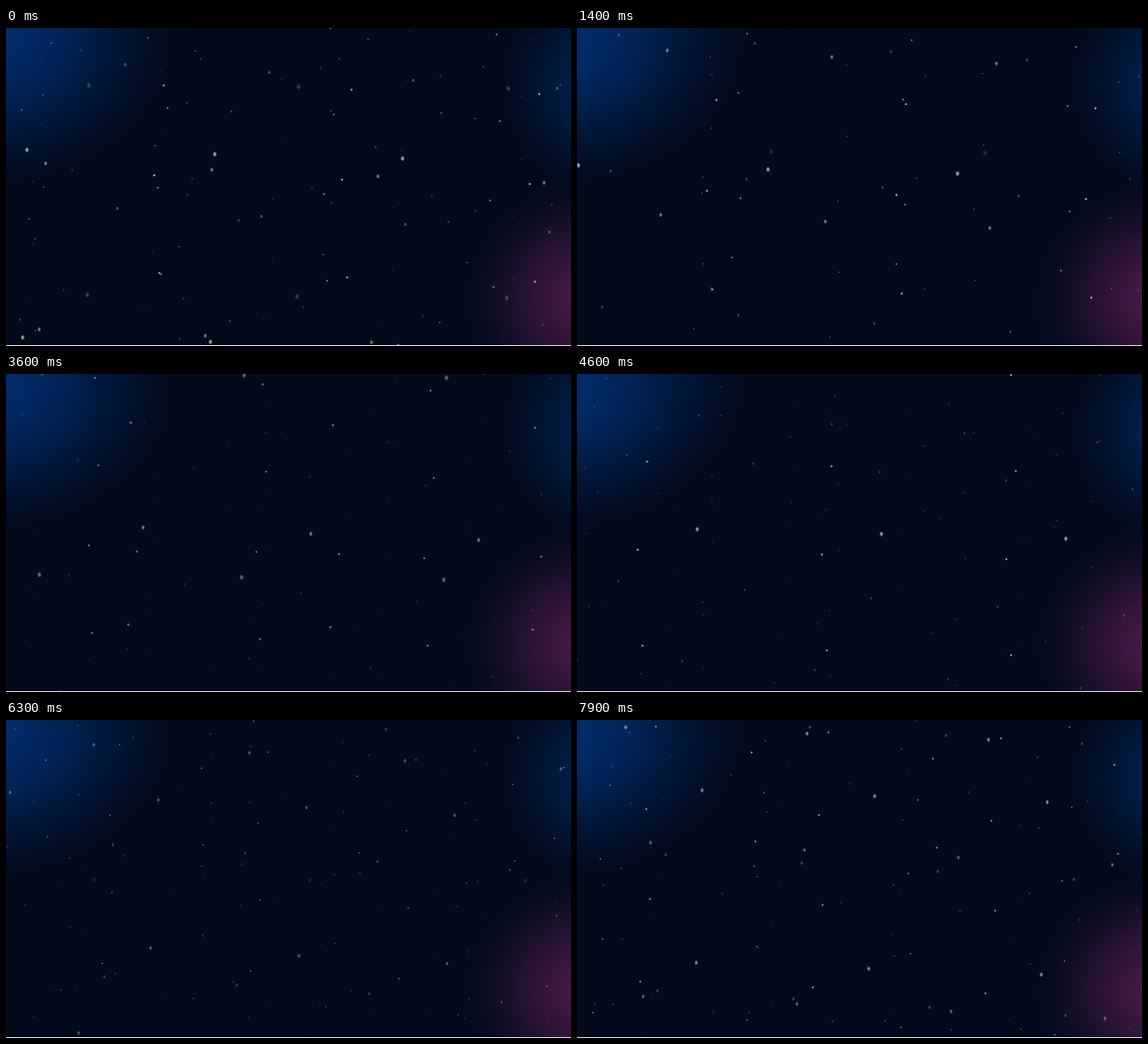
Animation of 600 by 338 pixels, one loop 8000 ms. Source, as an HTML page with a canvas:

```html
<!DOCTYPE html>
<html lang="en">
<head>
<meta charset="utf-8">
<title>Star field</title>
<style>
  html, body { margin: 0; width: 100%; height: 100%; overflow: hidden; background: #020a1c; }
  canvas { display: block; }
</style>
</head>
<body>
<canvas id="sky" width="600" height="338"></canvas>
<script>
const W = 600, H = 338, LOOP = 8000, STEP = 100, CYCLE = 10000;
const CENTER = [328, 169], TILE = 106;
const ctx = document.getElementById('sky').getContext('2d');

// Offsets inside a tile: one large oval star, two small round ones.
const COMMON = [[0, 0], [-33.9, 12.7], [-29.7, -38.2]];
const WIDE = [[0, 0], [46.9, 25.6], [50.9, -12.8]];
const TALL = [[0, 0], [-33.6, 12.8], [-29.5, 67.4]];

const layer = (phase, x, y, stars = COMMON, w = TILE, h = TILE) => ({ phase, x, y, stars, w, h });
const layers = [
  layer(0.95, -8.6, -50.6),
  layer(0.95, -51.4, -87.7, TALL, 111.4, 206.4),
  layer(0.83, 49.1, -17.2),
  layer(0.70, 39.9, -8.4),
  layer(0.55, -38.1, 23.7, WIDE),
  layer(0.35, -2.5, 0.6)
];

function radial(stops) {
  const g = ctx.createRadialGradient(0, 0, 0, 0, 0, 1);
  stops.forEach(([at, color]) => g.addColorStop(at, color));
  return g;
}

const dot = v => radial([[0, `rgb(${v},${v},${v})`], [1, `rgba(${v},${v},${v},0)`]]);
const kinds = [
  { rx: 1.27, ry: 1.7, fill: dot(221) },
  { rx: 0.85, ry: 0.85, fill: dot(255) },
  { rx: 0.85, ry: 0.85, fill: dot(238) }
];

function oval(x, y, rx, ry, fill) {
  ctx.save();
  ctx.translate(x, y);
  ctx.scale(rx, ry);
  ctx.fillStyle = fill;
  ctx.fillRect(-1, -1, 2, 2);
  ctx.restore();
}

function glow(x, y, rx, ry, rgb) {
  const fade = [[0, 1], [0.2, 0.89], [0.4, 0.68], [0.6, 0.39], [0.8, 0.13], [0.9, 0.04], [1, 0]];
  oval(x, y, rx, ry, radial(fade.map(([at, a]) => [at, `rgba(${rgb},${a})`])));
}

// cubic-bezier(.42, 0, 1, 1)
function easeIn(x) {
  let lo = 0, hi = 1;
  for (let i = 0; i < 24; i++) {
    const u = (lo + hi) / 2;
    const bx = 1.26 * u * (1 - u) ** 2 + 3 * (1 - u) * u * u + u ** 3;
    if (bx < x) lo = u; else hi = u;
  }
  return lo * lo * (3 - 2 * lo);
}

function drawLayer({ phase, x, y, stars, w, h }, t) {
  const p = (phase + t / CYCLE) % 1;
  const e = easeIn(p), zoom = 1 + 1.2 * e;
  const spanX = 370 / zoom + 30, spanY = 210 / zoom + 40;
  ctx.save();
  ctx.globalAlpha = p < 0.85 ? easeIn(p / 0.85) : (1 - p) / 0.15;
  ctx.translate(...CENTER);
  ctx.rotate((1 - e) * 5 * Math.PI / 180);
  ctx.scale(zoom, zoom);
  stars.forEach(([dx, dy], i) => {
    const { rx, ry, fill } = kinds[i];
    const x0 = x + dx, y0 = y + dy;
    const left = x0 + Math.ceil((-spanX - x0) / w) * w;
    const top = y0 + Math.ceil((-spanY - y0) / h) * h;
    for (let sy = top; sy < spanY; sy += h)
      for (let sx = left; sx < spanX; sx += w) oval(sx, sy, rx, ry, fill);
  });
  ctx.restore();
}

function draw(t) {
  ctx.fillStyle = '#020a1c';
  ctx.fillRect(0, 0, W, H);
  glow(-20, 10, 210, 165, '0,46,110');
  glow(650, 60, 135, 130, '0,38,90');
  glow(622, 288, 140, 130, '72,26,70');
  layers.forEach(l => drawLayer(l, t));
  ctx.fillStyle = '#d8dade';
  ctx.fillRect(0, H - 1, W, 1);
}

const start = performance.now();
function frame() {
  const t = (performance.now() - start) % LOOP;
  draw(Math.floor(t / STEP) * STEP);
  requestAnimationFrame(frame);
}
frame();
</script>
</body>
</html>
```
